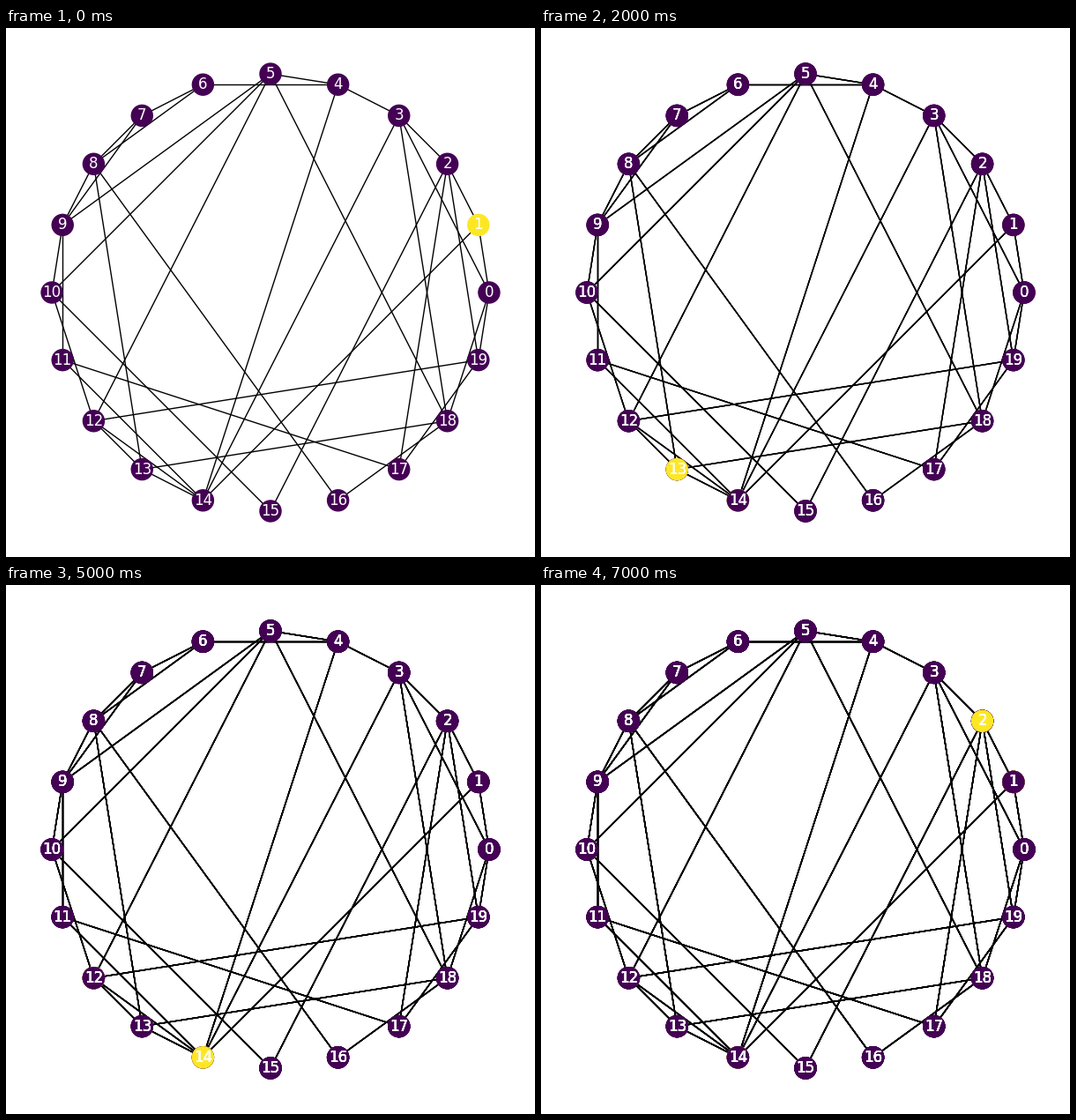
Recreate the animation shown at these times as a matplotlib script. Size 600 by 600 pixels, loop 8 s.

```python
import matplotlib.pyplot as plt
import numpy as np
from matplotlib.animation import FuncAnimation
from matplotlib.collections import LineCollection

N = 20
# Small-world graph: node u links to u + 1 and u + 2, except for the rewired
# links, listed per step as {u: new end}.
REWIRED = {
    1: {5: 9, 10: 5, 11: 14, 14: 3, 15: 2, 16: 8, 17: 2, 18: 5},
    2: {0: 3, 1: 14, 2: 19, 3: 18, 5: 12, 8: 13, 11: 17, 13: 18, 14: 4,
        15: 10, 19: 12},
}
WALK = [1, 14, 13, 14, 12, 14, 1, 2]  # node visited at each step
PURPLE, YELLOW = "#440154", "#fde725"

angle = 2 * np.pi * np.arange(N) / N
pos = np.column_stack([np.cos(angle), np.sin(angle)])
segments = [(pos[u], pos[moved.get(u, (u + step) % N)])
            for step, moved in REWIRED.items() for u in range(N)]

fig = plt.figure(figsize=(6, 6), dpi=100, facecolor="white")
ax = fig.add_axes([0, 0, 1, 1])
ax.set_axis_off()


def draw_graph(active):
    """Draw the whole graph once and return its artists."""
    colors = [YELLOW if n == active else PURPLE for n in range(N)]
    edges = LineCollection(segments, colors="black", linewidths=1, zorder=1)
    ax.add_collection(edges)
    nodes = ax.scatter(*pos.T, s=300, c=colors, linewidths=1, zorder=2)
    labels = [
        ax.text(x, y, str(n), size=12, color="white", family="DejaVu Sans",
                ha="center", va="center", zorder=3)
        for n, (x, y) in enumerate(pos)
    ]
    return [edges, nodes, *labels]


# Each step paints over the earlier ones, so lines and labels grow heavier.
layers = [draw_graph(node) for node in WALK]
ax.set_xlim(-1.21, 1.21)
ax.set_ylim(-1.21, 1.21)


def update(step):
    for i, layer in enumerate(layers):
        for artist in layer:
            artist.set_visible(i <= step)
    return []


anim = FuncAnimation(fig, update, frames=len(WALK), interval=1000,
                     repeat=True, repeat_delay=0, blit=False)
plt.show()
```
